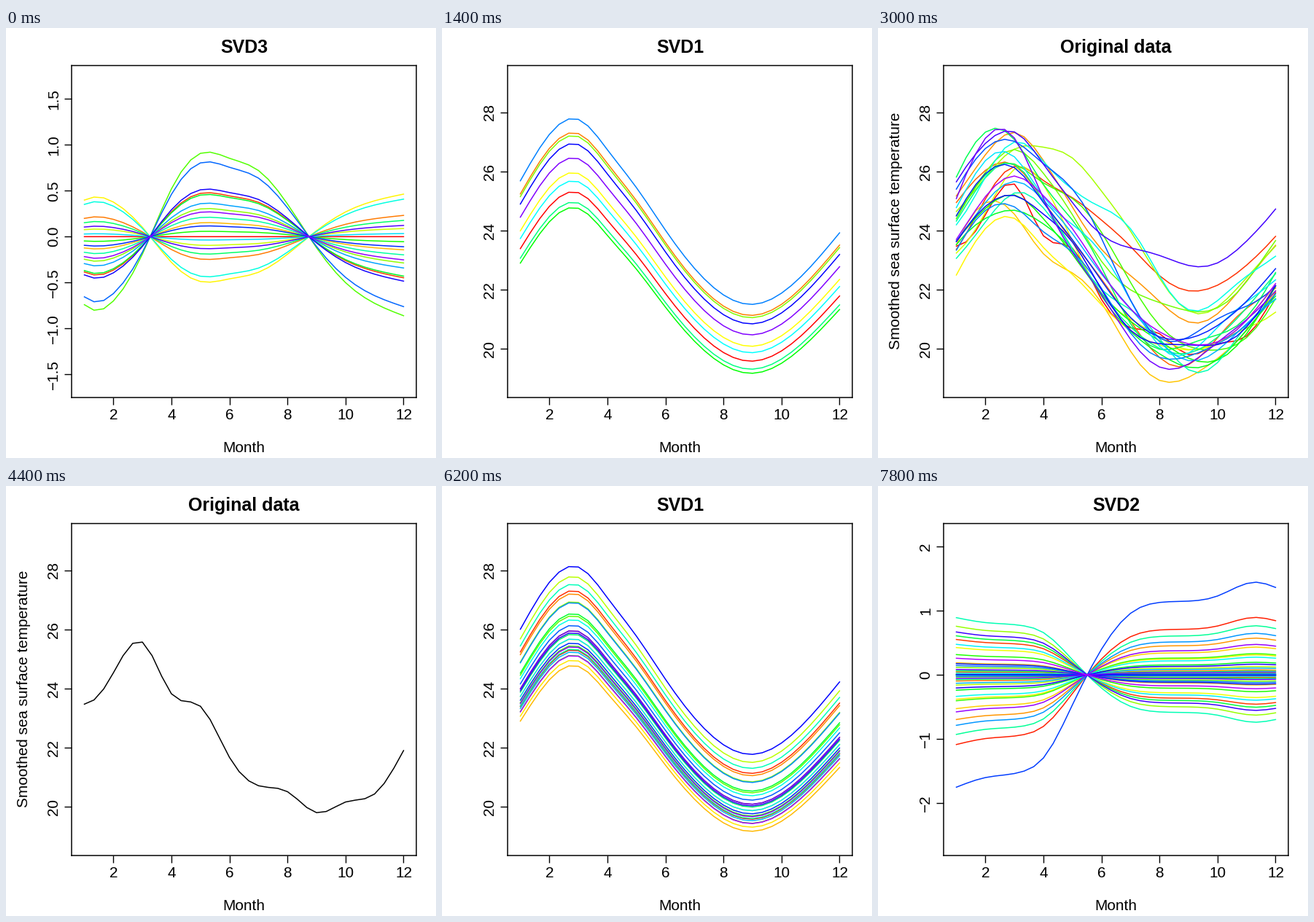
A matplotlib script for the animation above (8000 ms loop, 590 px wide and 590 px high).

```python
import colorsys
import matplotlib.pyplot as plt
import numpy as np
from matplotlib.animation import FuncAnimation

SIZE, DPI = 590, 100
FRAMES, INTERVAL = 40, 200
YEARS = 49
PX = 72 / DPI  # points per pixel

plt.rcParams["font.family"] = "Liberation Sans"
plt.rcParams["path.snap"] = False

MONTHS = np.linspace(1, 12, 34)


def spline(points):
    """Natural cubic spline through (month, value) points, at MONTHS."""
    x, y = np.array(points, float).T
    h, n = np.diff(x), len(x)
    a, b = np.eye(n), np.zeros(n)
    for i in range(1, n - 1):
        a[i, i - 1:i + 2] = h[i - 1], 2 * (h[i - 1] + h[i]), h[i]
        b[i] = 6 * ((y[i + 1] - y[i]) / h[i] - (y[i] - y[i - 1]) / h[i - 1])
    m = np.linalg.solve(a, b)
    i = np.clip(np.searchsorted(x, MONTHS, side="right") - 1, 0, n - 2)
    u, v = x[i + 1] - MONTHS, MONTHS - x[i]
    cubic = (m[i] * u**3 + m[i + 1] * v**3) / (6 * h[i])
    left = (y[i] / h[i] - m[i] * h[i] / 6) * u
    right = (y[i + 1] / h[i] - m[i + 1] * h[i] / 6) * v
    return cubic + left + right


def spread(step):
    """Evenly scattered values in -1..1, one per year."""
    return (np.arange(YEARS) * step + 1) % 2 - 1


# Component shapes over the year
season = spline([(1, 25.69), (2, 27.26), (3, 27.77), (4, 26.74), (5, 25.46),
                 (6, 24.02), (8, 21.83), (9, 21.51), (10, 21.89),
                 (12, 23.93)]) / 27.78
swing = spline([(1, -1.75), (2, -1.6), (3.33, -1.5), (4, -1.295), (5, -.466),
                (6, .4), (7, .96), (8, 1.13), (10, 1.23), (11.33, 1.446),
                (12, 1.364)])
bulge = spline([(1, -.74), (1.33, -.8), (2, -.7), (3, -.19), (4, .52),
                (5, .907), (6, .853), (7, .72), (8, .355), (9, -.12),
                (10, -.5), (12, -.86)])

# Yearly strength of each component: an even scatter, then the strong years
golden = np.sqrt(5) - 1
level = 25.1 + 2.1 * (np.arange(YEARS) * np.sqrt(3) % 1) ** 1.6
level[:10] = 25.3, 27.3, 25.95, 27.2, 24.77, 24.95, 25.67, 27.78, 26.93, 26.45
tilt = spread(np.sqrt(2))
tilt *= -.46 * np.abs(tilt)
bend = -.57 * spread(golden)

STRONG = {1: (27.3, .62, .52), 7: (27.78, .3, 1), 15: (27.52, .23, .885),
          22: (28.13, .53, -.25), 23: (25.88, -.51, -.55),
          32: (27.05, 1, -.6), 33: (29.3, -.1, 1.88),
          47: (29.2, 1.5, 1.3), 48: (28.57, -1.1, .3)}
for year, scores in STRONG.items():
    level[year], tilt[year], bend[year] = scores

svd1 = np.outer(level, season)
svd2 = np.outer(tilt, swing)
svd3 = np.outer(bend, bulge)

# Yearly data: the three parts plus a smooth remainder
rng = np.random.default_rng(5)
data = svd1 + svd2 + svd3
for k in range(2, 7):
    amp = rng.normal(0, .17, (YEARS, 1))
    phase = rng.uniform(0, 2 * np.pi, (YEARS, 1))
    data += amp * np.sin(k * np.pi * (MONTHS - 1) / 11 + phase)

# The first year is also shown alone
data[0] = spline([(1, 23.48), (1.33, 23.62), (2, 24.54), (2.67, 25.54),
                  (3, 25.58), (4, 23.83), (4.33, 23.6), (5, 23.41),
                  (6, 21.68), (7, 20.72), (8, 20.52), (9, 19.81),
                  (10, 20.17), (11, 20.44), (12, 21.91)])

# title, curves, y limits, ticks, tick format, y label
WARM = (18.36, 29.59)
PANELS = {
    "data": ("Original data", data, WARM, range(20, 29, 2), "{:.0f}",
             "Smoothed sea surface temperature"),
    "svd1": ("SVD1", svd1, WARM, range(20, 29, 2), "{:.0f}", ""),
    "svd2": ("SVD2", svd2, (-2.815, 2.36), range(-2, 3), "{:.0f}", ""),
    "svd3": ("SVD3", svd3, (-1.75, 1.862), np.arange(-1.5, 2, .5),
             "{:.1f}", ""),
}

RUNS = [(0, "svd3"), (3, "data"), (5, "svd1"), (10, "data"), (18, "svd2"),
        (20, "data"), (24, "svd1"), (35, "svd2")]
COUNT_AT = [0, 7, 15, 22, 27, 31, 39]
COUNTS = [20, 10, 25, 1, 49, 27, 41]


def rainbow(n):
    if n == 1:
        return ["black"]
    steps = int(1.25 * n)
    return [colorsys.hsv_to_rgb(i / steps, 1, 1) for i in range(n)]


fig = plt.figure(figsize=(SIZE / DPI, SIZE / DPI), dpi=DPI, facecolor="white")
ax = fig.add_axes([90 / SIZE, 1 - 507 / SIZE, 473 / SIZE, 455.5 / SIZE])
ax.set_xlim(.56, 12.44)
ax.set_xticks(range(2, 13, 2))
ax.tick_params(length=10 * PX, width=1.4 * PX, labelsize=20.8 * PX,
               pad=5 * PX)
ax.tick_params(axis="y", labelrotation=90)
for spine in ax.spines.values():
    spine.set_linewidth(1.5 * PX)


def label(x, y, size, text="", **kw):
    return fig.text(x / SIZE, 1 - y / SIZE, text, fontsize=size * PX,
                    ha="center", **kw)


title = label(326.5, 34, 25, va="baseline", weight="bold")
label(326.5, 582, 20.8, "Month", va="baseline")
ylabel = label(24.5, 278.5, 20.8, va="center", rotation=90)
lines = [ax.plot([], [], lw=1.5 * PX)[0] for _ in range(YEARS)]


def draw(frame):
    panel = [name for start, name in RUNS if start <= frame][-1]
    count = int(round(np.interp(frame, COUNT_AT, COUNTS)))
    heading, curves, limits, ticks, fmt, side = PANELS[panel]
    title.set_text(heading)
    ylabel.set_text(side)
    ax.set_yticks(list(ticks),
                  [fmt.format(t).replace("-", "\u2212") for t in ticks],
                  va="center")
    ax.set_ylim(limits)
    for line in lines[count:]:
        line.set_visible(False)
    for line, curve, color in zip(lines, curves, rainbow(count)):
        line.set_visible(True)
        line.set_data(MONTHS, curve)
        line.set_color(color)
    return lines


anim = FuncAnimation(fig, draw, frames=FRAMES, interval=INTERVAL,
                     init_func=lambda: draw(0), repeat=True, repeat_delay=0)
plt.show()
```
